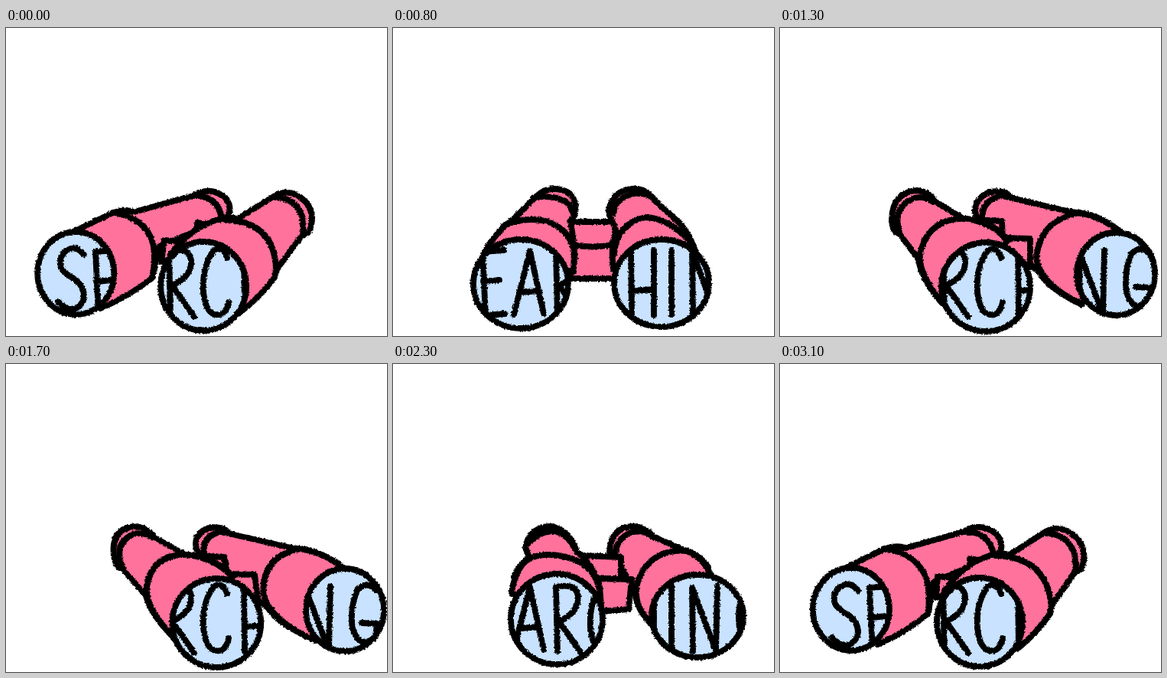
An HTML page for the animation above (3.2 s loop, 498 by 402 pixels).

```html
<!DOCTYPE html>
<html lang="en">
<head>
<meta charset="utf-8">
<title>Searching</title>
<style>
  html, body { margin: 0; width: 100%; height: 100%; overflow: hidden; background: #fff; }
  svg { display: block; width: 498px; height: 402px; }
  #scene { fill: none; stroke: #000; stroke-width: 7.8; stroke-linecap: round; stroke-linejoin: round; }
  .pink { fill: #ff729c; }
  .glass { fill: #c8e2ff; stroke: none; }
</style>
</head>
<body>
<svg viewBox="0 0 498 402" role="img" aria-label="Binoculars looking across the word SEARCHING">
  <defs>
    <filter id="rough" filterUnits="userSpaceOnUse" x="0" y="0" width="498" height="402" color-interpolation-filters="sRGB">
      <feTurbulence id="noise" type="fractalNoise" baseFrequency=".4" numOctaves="2" result="grain"/>
      <feDisplacementMap in="SourceGraphic" in2="grain" scale="3.5" xChannelSelector="R" yChannelSelector="G"/>
    </filter>
  </defs>
  <g filter="url(#rough)"><g id="scene"></g></g>
</svg>
<script>
// The word stays still; each lens is a window onto it.
const word = [
  'M102 296Q90 280 75 294Q64 312 82 323Q106 336 101 356Q88 378 68 357',
  'M145 290L117 292L121 375L146 373M118 331L139 329',
  'M158 374L179 291L197 373M165 345L191 343',
  'M213 291L215 375M213 291Q243 285 242 307Q241 325 217 336L246 377',
  'M289 300Q284 284 272 290Q256 310 258 345Q262 378 280 374Q288 372 291 358',
  'M311 290L312 375M341 290L341 375M312 343L341 341',
  'M364 290L364 374',
  'M392 375L391 292L422 374L424 290',
  'M484 295Q472 282 459 295Q449 320 453 345Q462 374 483 356L485 339L465 338'
].join('');

const tube = (lens, body, lines) => ({ lens, body, lines });
const bridge = (body, lines = '') => ({ body, lines });

const farLeft = [
  tube([93, 320, 50, 54],
    'M88 265L137 241Q152 236 165 240L240 219Q262 205 283 222Q294 236 286 248L200 285L194 325Q170 347 128 366Z',
    'M137 241Q180 247 192 282Q197 305 193 326M240 219Q272 218 279 247'),
  bridge('M204 305L206 277L228 279L248 266L248 254L270 257L250 290Z'),
  tube([261, 337, 56, 58],
    'M215 296Q240 260 275 250Q288 246 300 249L347 219Q368 207 389 228Q403 246 394 267L385 272L356 314L353 326Q335 352 310 372Z',
    'M275 250Q340 249 352 300Q356 315 353 325M348 221Q376 222 385 248L387 267')
];

const left = [
  tube([115, 325, 53, 53],
    'M82 282Q105 252 150 245Q165 242 175 245L222 219Q240 206 262 218Q276 230 272 245L266 250L206 285L206 325Q190 348 153 368Z',
    'M150 245Q198 248 206 290Q208 315 202 325M222 219Q262 216 267 248'),
  bridge('M243 280V252L290 250V280ZM215 280L260 282V326L212 320Z'),
  tube([290, 334, 57, 58],
    'M245 297Q262 262 295 252L328 222Q350 205 372 225Q388 240 379 257L373 262L367 310Q368 345 340 372Z',
    'M262 278Q270 255 305 251Q355 258 366 300Q369 318 364 335M328 222Q362 220 370 240L372 258')
];

const middle = [
  bridge('M232 253H290V327H232Z', 'M236 283Q260 288 285 283'),
  tube([167, 334, 62, 58],
    'M118 295Q135 265 157 250L187 220Q205 203 230 215Q243 228 237 244L232 252L237 285L236 318Z',
    'M145 258Q170 246 200 252Q234 262 238 300M184 221Q215 217 230 230L237 245'),
  tube([351, 333, 62, 57],
    'M288 315Q284 280 292 265L282 242Q283 215 310 210Q330 207 343 226L375 255Q388 270 395 290Z',
    'M289 295Q292 255 330 247Q360 248 388 278M288 242Q290 222 315 216Q335 215 342 224')
];

const right = [
  tube([398, 329, 60, 54],
    'M345 345Q318 325 316 295L290 252L283 245Q285 212 315 212Q330 213 340 225L378 242Q405 250 415 275Z',
    'M340 342Q305 308 325 272Q345 240 385 244Q402 250 412 265M290 250Q292 225 315 219Q330 217 340 226'),
  bridge('M245 250L298 252V280H255ZM262 280L312 281L308 320L270 323Z'),
  tube([214, 333, 60, 59],
    'M155 300Q158 270 178 252L173 240Q178 212 208 212Q232 218 240 245Q262 262 270 290L272 315Z',
    'M158 278Q170 248 205 249Q262 252 270 295M177 234Q190 218 212 218Q230 224 237 240')
];

const farRight = [
  tube([439, 321, 51, 54],
    'M394 361Q350 340 338 318L262 250Q251 245 257 228Q270 208 295 215L303 222L380 240Q420 243 445 268Z',
    'M394 360Q340 335 335 300Q340 250 392 241Q420 245 445 266M265 250Q262 225 290 219L303 222'),
  bridge('M245 250L290 252L291 274L327 275V312L290 290Z', 'M290 276H300'),
  tube([269, 338, 58, 58],
    'M213 360Q185 330 181 302L155 267Q147 268 146 250Q147 215 178 212Q195 213 202 226L240 249Q277 252 297 278Z',
    'M211 358Q177 315 184 290Q197 246 245 249Q280 254 297 275M156 266Q146 235 175 222Q190 219 200 227')
];

const scene = document.getElementById('scene');
const noise = document.getElementById('noise');
const STEP = 100, STEPS = 32, HOLD = 10, PIVOT = 290;
const sweep = [left, middle, right];

// Ten steps at each end, two steps on each pose between.
function poseAt(step) {
  const n = (step + 4) % STEPS;
  const k = n % 16;
  const goingRight = n < 16;
  if (k < HOLD) {
    const leaning = (k >> 2) & 1;
    return { parts: goingRight ? farLeft : farRight, lean: leaning * (goingRight ? -0.06 : 0.13) };
  }
  const i = (k - HOLD) >> 1;
  return { parts: sweep[goingRight ? i : 2 - i], lean: 0 };
}

function drawPart({ lens, body, lines }, i, lean) {
  const skew = `matrix(1 0 ${lean} 1 ${-lean * PIVOT} 0)`;
  const shape = `<g transform="${skew}"><path class="pink" d="${body}"/><path d="${lines}"/></g>`;
  if (!lens) return shape;
  const [cx, cy, rx, ry] = lens;
  const ellipse = attrs =>
    `<ellipse cx="${cx + lean * (cy - PIVOT)}" cy="${cy}" rx="${rx}" ry="${ry}" ${attrs}/>`;
  return shape + `<clipPath id="lens${i}">${ellipse('')}</clipPath>` + ellipse('class="glass"') +
    `<path d="${word}" clip-path="url(#lens${i})"/>` + ellipse('');
}

let shown = -1;
function render() {
  const step = Math.floor(performance.now() / STEP) % STEPS;
  if (step !== shown) {
    shown = step;
    const { parts, lean } = poseAt(step);
    scene.innerHTML = parts.map((part, i) => drawPart(part, i, lean)).join('');
    noise.setAttribute('seed', step + 1);
  }
  requestAnimationFrame(render);
}
render();
</script>
</body>
</html>
```
